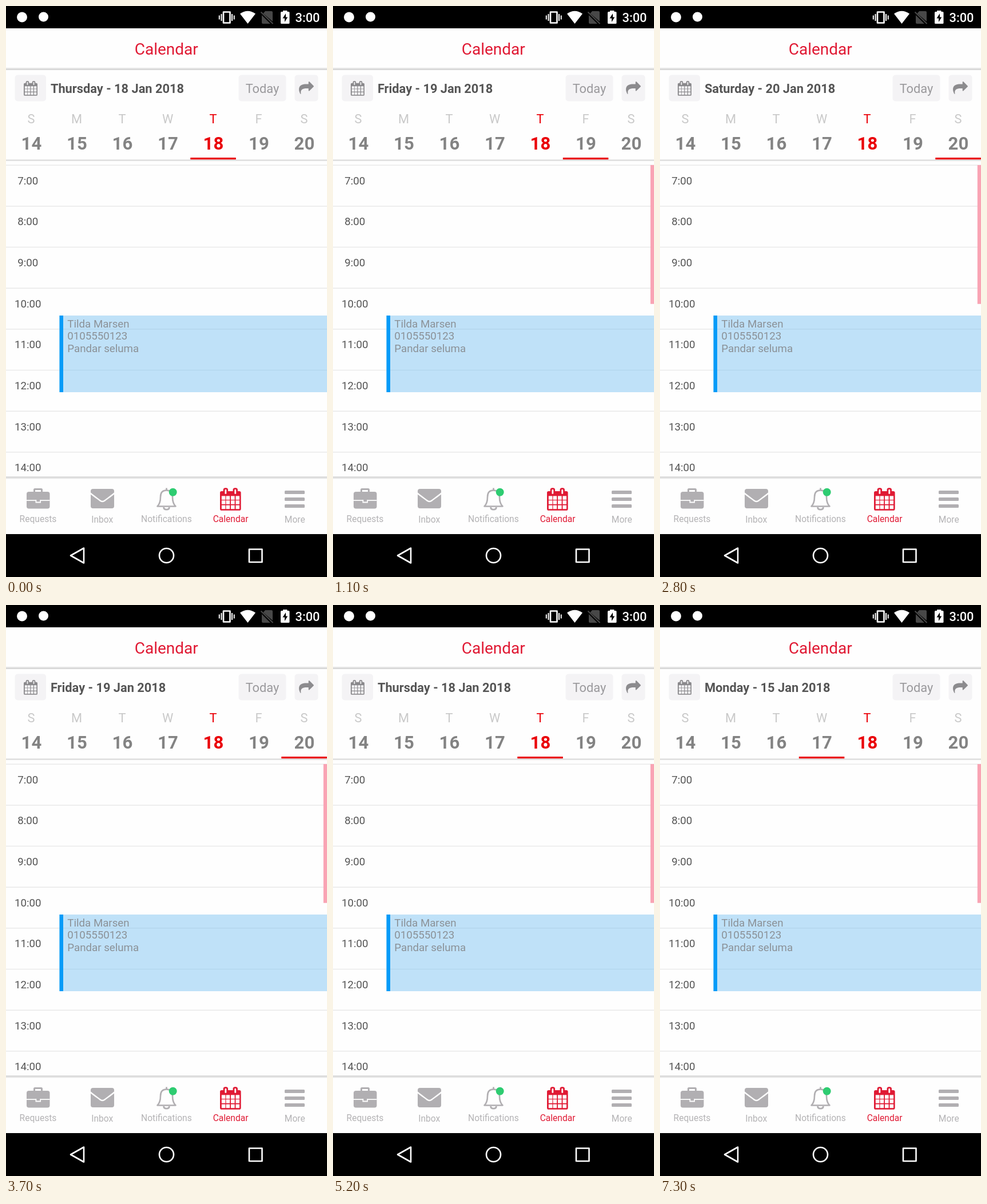
These frames come from a looping animation (561x998 px, 8 s). An HTML page with a canvas:

```html
<!DOCTYPE html>
<html lang="en">
<head>
<meta charset="utf-8">
<title>Calendar</title>
<style>
html, body { margin: 0; width: 100%; height: 100%; overflow: hidden; background: #000; }
canvas { display: block; width: 561px; height: 998px; }
</style>
</head>
<body>
<canvas id="stage" width="561" height="998"></canvas>
<script>
const ctx = document.getElementById('stage').getContext('2d');
const LOOP = 8000, STEP = 100, W = 561;
const RED = '#e01a34', HOT = '#ea0008', GREY = '#b1afb2', INK = '#555';
const COL0 = 4.3, COL = 79.5, ROW0 = 278.3, ROW = 71.65;

// [start time, value]
const titles = [
  [0, 'Thursday - 18'], [500, 'Friday - 19'], [2000, 'Saturday - 20'],
  [3700, 'Friday - 19'], [4700, 'Thursday - 18'], [5800, 'Wednesday - 17'],
  [7300, 'Monday - 15']
];
const selected = [[0, 4], [900, 5], [2700, 6], [4100, 5], [5200, 4], [6200, 3]];
// [time of reload, whether the hour lines stay]
const reloads = [[1000, false], [2700, false], [4200, true], [5300, true], [6300, false]];

const at = (list, t) => list.filter(e => e[0] <= t).pop()[1];

function rect(x, y, w, h, color, r = 0) {
  ctx.fillStyle = color;
  ctx.beginPath();
  ctx.roundRect(x, y, w, h, r);
  ctx.fill();
}

function disc(x, y, r, color) {
  ctx.fillStyle = color;
  ctx.beginPath();
  ctx.arc(x, y, r, 0, Math.PI * 2);
  ctx.fill();
}

function fill(d, color) {
  ctx.fillStyle = color;
  ctx.fill(new Path2D(d));
}

function line(d, color, width) {
  ctx.strokeStyle = color;
  ctx.lineWidth = width;
  ctx.lineJoin = 'round';
  ctx.stroke(new Path2D(d));
}

function text(str, x, y, size, color, align = 'left', weight = 400) {
  ctx.font = `${weight} ${size}px Roboto, sans-serif`;
  ctx.textAlign = align;
  ctx.fillStyle = color;
  ctx.fillText(str, x, y);
}

function calendarIcon(x, y, scale, color, back) {
  ctx.save();
  ctx.translate(x, y);
  ctx.scale(scale, scale);
  rect(0, 256, 1664, 1536, color, 128);
  for (const cx of [448, 1216]) {
    rect(cx - 192, 0, 384, 560, color, 160);
    rect(cx - 64, 128, 128, 352, back, 40);
  }
  for (const cx of [128, 480, 864, 1248])
    for (const cy of [640, 992, 1376]) rect(cx, cy, 300, 300, back);
  ctx.restore();
}

function shareIcon() {
  ctx.save();
  ctx.translate(512, 131);
  ctx.scale(0.0145, 0.0145);
  fill('M1773 685L1261 1197Q1190 1240 1152 1152V896H928C420 896 224 1050 224 1382' +
    'C224 1440 232 1500 232 1555Q232 1590 200 1590Q172 1590 160 1560C60 1350 0 1180 0 1050' +
    'C0 560 300 384 928 384H1152V128Q1190 40 1261 83L1773 595Q1800 640 1773 685Z', '#8c8b8e');
  ctx.restore();
}

function statusBar() {
  rect(0, 0, W, 39, '#000');
  disc(28, 19.5, 9, '#fff');
  disc(65.5, 19, 8.5, '#fff');
  line('M380 10.5H391.5V29.5H380Z', '#fff', 2.6);
  line('M376.5 14V26M395 14V26M372.8 16.5V23.5M398.7 16.5V23.5', '#fff', 2);
  fill('M422.5 31L409 13.5Q422.5 4 436 13.5Z', '#fff');
  fill('M453 9H464Q466 9 466 11V27L449.5 13Z', '#484848');
  fill('M447 16L462 31H449Q447 31 447 29Z', '#484848');
  line('M445.5 10.5L466.5 31', '#484848', 2);
  rect(484, 8, 7.5, 4, '#fff');
  rect(480, 10, 15.5, 21, '#fff', 1.5);
  fill('M489 13L483.5 21.5H487V28L492.3 19.5H489Z', '#000');
  text('3:00', 527, 28, 21.8, '#fff', 'center', 500);
}

function header(t) {
  rect(0, 39, W, 232, '#fefefe');
  text('Calendar', 280.3, 85, 28, RED, 'center');
  rect(0, 108, W, 2, '#e6e6e6');
  rect(0, 110, W, 2, '#d6d6d6');

  rect(15.5, 120.5, 54.5, 46, '#f4f3f5', 5);
  calendarIcon(31, 131, 0.0144, '#8a898c', '#f4f3f5');
  text(at(titles, t) + ' Jan 2018', 77.9, 152, 21.8, INK, 'left', 700);
  rect(406.5, 120.5, 83, 46, '#f4f3f5', 5);
  text('Today', 448, 152, 21.8, '#9a999c', 'center');
  rect(504.5, 120.5, 41, 46, '#f4f3f5', 5);
  shareIcon();

  [...'SMTWTFS'].forEach((day, i) => {
    const x = COL0 + COL * (i + 0.5), today = i === 4;
    text(day, x, 204.5, 21.8, today ? HOT : '#c9c9c9', 'center');
    text(String(14 + i), x + 0.4, 250.5, 31.1, today ? HOT : '#838383', 'center', 700);
  });
  rect(0, 268.3, W, 2.7, '#e0e0e0');
  rect(COL0 + COL * at(selected, t), 265, COL, 3.3, HOT);
}

function barAlpha(t) {
  if (t < 1100) return 0;
  if (t < 2000 || t >= 2700) return 1;
  return Math.max(0.05, 0.8 - (t - 2000) / 400);
}

function dayView(t) {
  rect(0, 271, W, 552, '#fefefe');
  const reload = reloads.find(r => r[0] === t);
  if (!reload || reload[1])
    for (let i = 0; i < 8; i++) rect(0, ROW0 + ROW * i - 0.8, W, 1.5, '#e9e9e9');
  if (reload) return;

  for (let i = 0; i < 8; i++)
    text(`${7 + i}:00`, 38.2, ROW0 + ROW * i + 33.3, 18.7, INK, 'center');

  rect(93.5, 541, 467.5, 134, '#bfe1f8');
  for (const i of [4, 5]) rect(100, ROW0 + ROW * i - 0.8, 461, 1.5, '#b3d6ee');
  rect(93.5, 541, 6.5, 134, '#059bf8');
  ['Tilda Marsen', '0105550123', 'Pandar seluma'].forEach((s, i) =>
    text(s, 107.3, 561.5 + 21.9 * i, 18.7, '#8b9197'));

  ctx.globalAlpha = barAlpha(t);
  rect(554.8, 278, 6.2, 242.7, '#f9a4b4');
  ctx.globalAlpha = 1;
}

function tabBar() {
  rect(0, 823, W, 100, '#fefefe');
  rect(0, 822.5, W, 1.8, '#d2d2d2');
  rect(0, 824.3, W, 2, '#e2e2e2');

  // briefcase
  line('M49.5 851V845.5Q49.5 844.5 50.5 844.5H61.5Q62.5 844.5 62.5 845.5V851', GREY, 3);
  rect(36, 849, 40.5, 29.5, GREY, 4);
  rect(36, 863.2, 40.5, 1.8, '#fefefe');
  rect(51.5, 863.2, 9.5, 5.3, '#fefefe');
  rect(53.3, 862, 6, 4.5, GREY);

  // envelope
  rect(148, 844, 41, 34, GREY, 4);
  line('M147.5 851.5C154 857 160 861 164.5 864.5Q168.5 867.5 172.5 864.5C177 861 183 857 189.5 851.5',
    '#fefefe', 2.4);

  // bell
  line('M264.5 874.5C269.5 870 270 864 270 858C270 850 274 846.5 280.5 846.5' +
    'S291 850 291 858C291 864 291.5 870 296.5 874.5Z', GREY, 2.6);
  line('M280.5 842.5V846M275.5 876C276 881.5 285 881.5 285.5 876', GREY, 2.8);
  disc(291.7, 849.7, 7, '#2ecc71');

  calendarIcon(374, 842.3, 0.022, RED, '#fefefe');
  for (const y of [847, 859, 871]) rect(487, y, 35, 6, GREY, 1.5);

  ['Requests', 'Inbox', 'Notifications', 'Calendar', 'More'].forEach((s, i) =>
    text(s, 56 + 112.2 * i, i % 3 === 1 ? 903 : 902.3, 15.6, i === 3 ? RED : '#b4b3b5', 'center'));
}

function navBar() {
  rect(0, 923, W, 75, '#000');
  line('M113 960.5L136 947.5V973.5Z', '#fff', 2.6);
  line('M268 960.5a12.5 12.5 0 1 0 25 0a12.5 12.5 0 1 0 -25 0Z', '#fff', 2.6);
  line('M425 949.5H447.5V972H425Z', '#fff', 2.6);
}

function draw(t) {
  statusBar();
  dayView(t);
  header(t);
  tabBar();
  navBar();
}

const start = performance.now();
function tick() {
  const t = (performance.now() - start) % LOOP;
  draw(Math.floor(t / STEP) * STEP);
  requestAnimationFrame(tick);
}
tick();
</script>
</body>
</html>
```
